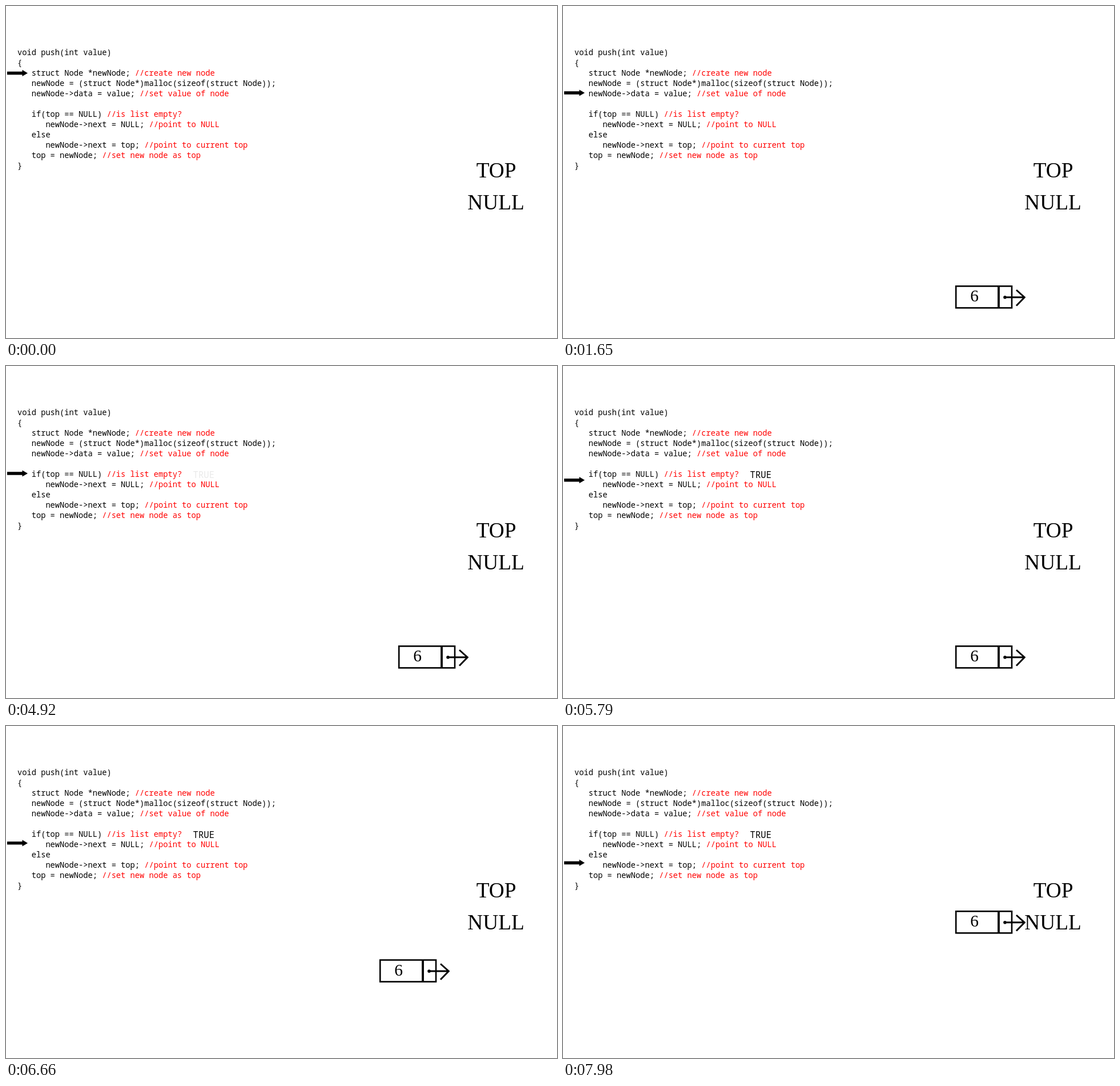
Write an HTML page that moves like this. It is 965 by 581 pixels and loops after 8 s.

```html
<!DOCTYPE html>
<html lang="en">
<head>
<meta charset="utf-8">
<title>Stack push</title>
<style>
  html, body { margin: 0; width: 100%; height: 100%; overflow: hidden; background: #fff; }
  svg { display: block; width: 965px; height: 581px; }
  .code { font: 13.73px "Noto Sans Mono", monospace; white-space: pre; }
  .note { fill: #f00; }
  .true { font-size: 15.6px; }
  .label { font: 37.33px "Liberation Serif", serif; text-anchor: middle; }
  .value { font-size: 29.33px; }
  .lines { fill: none; stroke: #000; stroke-width: 2.6; }
</style>
</head>
<body>
<svg viewBox="0 0 965 581">
  <g id="listing"></g>
  <path id="arrow" d="M2-2.7H28.5V-5.6L38 0L28.5 5.6V2.7H2Z"/>
  <text id="verdict" class="code true" x="327.6" y="196">TRUE</text>
  <text class="label" x="858.6" y="300">TOP</text>
  <text class="label" x="858" y="356.3">NULL</text>
  <g id="node">
    <g class="lines">
      <rect x="688.2" y="490.3" width="97.8" height="38"/>
      <path d="M763 490V528" stroke-width="3.8"/>
      <path d="M774 509.8H808M794 497L808.3 509.8L794 524.5" stroke-width="2.9"/>
    </g>
    <circle cx="774" cy="509.8" r="2.8"/>
    <text class="label value" x="720.6" y="517.4">6</text>
  </g>
  <path id="route" fill="none" d="M0 0C-17-24-33-52-33-83S-17-142 0-166"/>
</svg>
<script>
const LOOP = 8000, STEP = 30;
const code = `void push(int value)
{
   struct Node *newNode; //create new node
   newNode = (struct Node*)malloc(sizeof(struct Node));
   newNode->data = value; //set value of node

   if(top == NULL) //is list empty?
      newNode->next = NULL; //point to NULL
   else
      newNode->next = top; //point to current top
   top = newNode; //set new node as top
}`;

// Each move: start ms, end ms, start y, end y
const arrowMoves = [
  [-30, 720, 116, 152],
  [4140, 4890, 152, 188],
  [5250, 6030, 188, 204.9],
  [7260, 8010, 204.9, 240.9]
];

const [listing, arrow, verdict, node, route] =
  ["listing", "arrow", "verdict", "node", "route"].map(id => document.getElementById(id));
const routeLength = route.getTotalLength();

function svg(tag, attrs, parent) {
  const el = document.createElementNS("http://www.w3.org/2000/svg", tag);
  for (const key in attrs) el.setAttribute(key, attrs[key]);
  return parent.appendChild(el);
}

code.split("\n").forEach((line, row) => {
  const text = svg("text", { class: "code", x: 20, y: 86.4 + row * 18 }, listing);
  const split = line.indexOf("//");
  const end = split < 0 ? line.length : split;
  svg("tspan", {}, text).textContent = line.slice(0, end);
  svg("tspan", { class: "note" }, text).textContent = line.slice(end);
});

const progress = (t, start, end) => Math.min(1, Math.max(0, (t - start) / (end - start)));

function draw(now) {
  const t = Math.floor((now % LOOP) / STEP) * STEP;

  const move = arrowMoves.filter(([start]) => t >= start).pop();
  const [start, end, from, to] = move;
  const y = from + (to - from) * progress(t, start, end);
  arrow.setAttribute("transform", `translate(0 ${y})`);

  // The node fades in at half the frame rate
  const fadeTime = Math.floor((t - 1050) / 60) * 60 + 1050;
  node.setAttribute("opacity", progress(fadeTime, 990, 1650));
  verdict.setAttribute("opacity", progress(t, 4890, 5250));

  const spot = route.getPointAtLength(routeLength * progress(t, 6060, 7290));
  node.setAttribute("transform", `translate(${spot.x} ${spot.y})`);
}

const origin = performance.now();
function tick() {
  draw(performance.now() - origin);
  requestAnimationFrame(tick);
}
tick();
</script>
</body>
</html>
```
